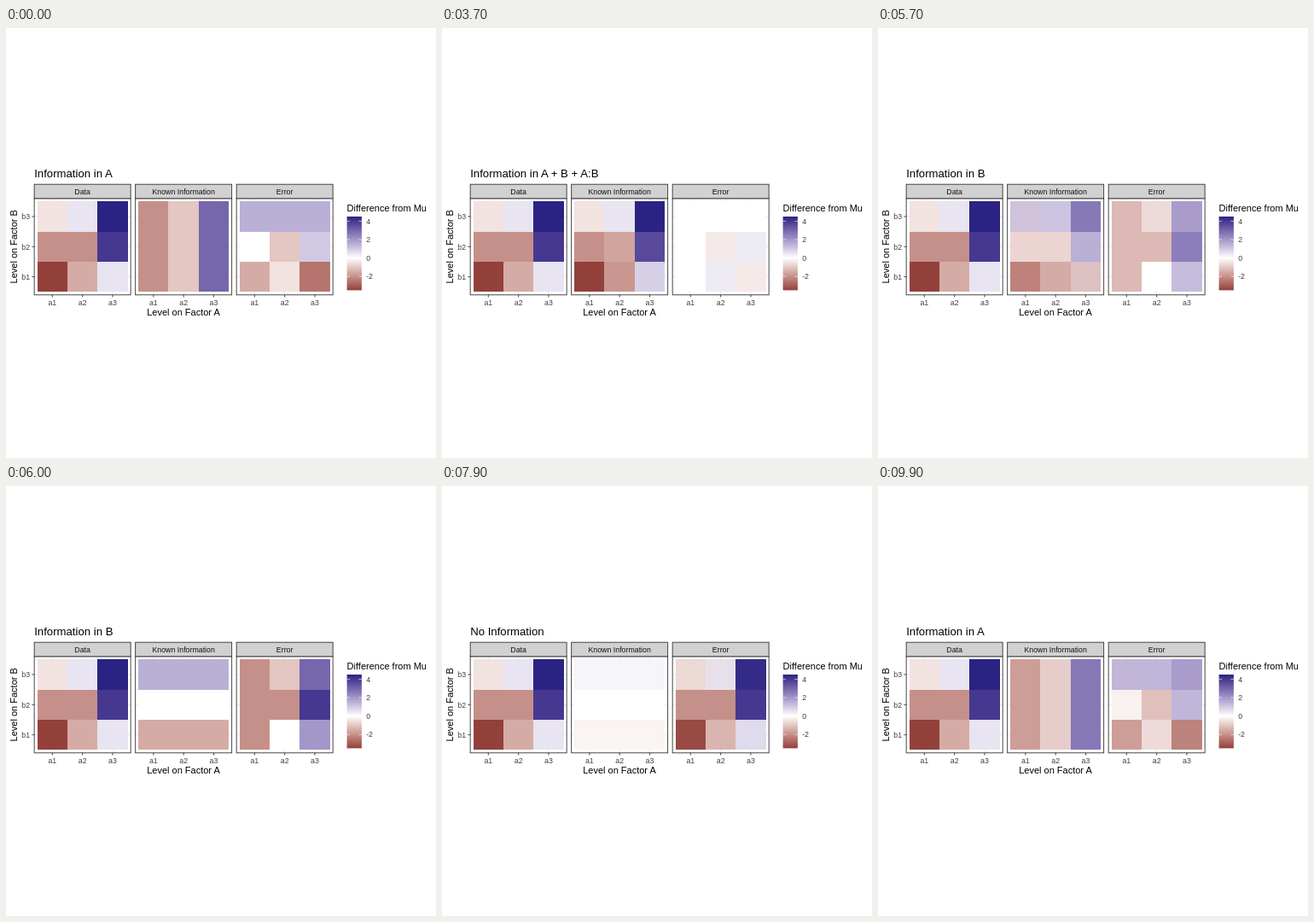
Write an HTML page that moves like this. It is 504x504 px and loops after 10000 ms.

```html
<!DOCTYPE html>
<html lang="en">
<head>
<meta charset="utf-8">
<style>
  html, body { margin: 0; width: 100%; height: 100%; overflow: hidden; background: #fff; }
  svg { display: block; width: 100vw; height: 100vh; font: 11px "Liberation Sans", Arial, sans-serif; }
  .small { font-size: 8.8px; fill: #3f3f3f; }
  .strip { font-size: 8.8px; fill: #111; }
  .mid { text-anchor: middle; }
  .end { text-anchor: end; }
  .grid { stroke: #e8e8e8; }
  .edge { stroke: #333; fill: none; stroke-width: .9; }
  .tile { shape-rendering: crispEdges; }
</style>
</head>
<body>
<svg viewBox="0 0 504 504"></svg>
<script>
const svg = document.querySelector('svg');

function add(tag, attrs, text, parent = svg) {
  const el = document.createElementNS('http://www.w3.org/2000/svg', tag);
  for (const key in attrs) el.setAttribute(key, attrs[key]);
  if (text) el.textContent = text;
  return parent.appendChild(el);
}
const label = (text, x, y, cls = '', more = {}) => add('text', { x, y, class: cls, ...more }, text);
const line = (x1, y1, x2, y2, cls) => add('line', { x1, y1, x2, y2, class: cls });
const mix = (from, to, p) => `color-mix(in lab, ${to} ${p * 100}%, ${from})`;
const colour = v => v < 0 ? mix('#fff', '#93403b', v / -3.5) : mix('#fff', '#2a2383', v / 4.5);

// Rows b1..b3, columns a1..a3, as differences from the mean
const data = [[-3.5, -1.5, .5], [-2, -2, 4], [-.5, .5, 4.5]];
const effectA = [-2, -1, 3];
const effectB = [-1.5, 0, 1.5];

const states = [
  ['Information in A', (i, j) => effectA[j]],
  ['Information in A + B', (i, j) => effectA[j] + effectB[i]],
  ['Information in A + B + A:B', (i, j) => data[i][j]],
  ['Information in B', i => effectB[i]],
  ['No Information', () => 0]
];
const panels = [
  ['Data', (known, i, j) => data[i][j]],
  ['Known Information', (known, i, j) => known(i, j)],
  ['Error', (known, i, j) => data[i][j] - known(i, j)]
];

const size = 113, unit = size / 3.2, left = 33.15, top0 = 199.8, bottom = top0 + size;
const tiles = [];

panels.forEach(([name, value], n) => {
  const x = left + n * 118.5;
  const centre = k => (k + .6) * unit;
  for (let k = 0; k < 3; k++) {
    line(x, top0 + centre(k), x + size, top0 + centre(k), 'grid');
    line(x + centre(k), top0, x + centre(k), bottom, 'grid');
  }
  for (let i = 0; i < 3; i++) for (let j = 0; j < 3; j++) {
    const el = add('rect', {
      x: x + (j + .1) * unit, y: top0 + (2.1 - i) * unit,
      width: unit, height: unit, class: 'tile'
    });
    tiles.push({ el, at: known => colour(value(known, i, j)) });
  }
  add('rect', { x, y: top0, width: size, height: size, class: 'edge' });
  add('rect', { x, y: 183.2, width: size, height: top0 - 183.2, class: 'edge', style: 'fill:#d1d1d1' });
  label(name, x + size / 2, 194.8, 'strip mid');
  for (let k = 0; k < 3; k++) {
    line(x + centre(k), bottom, x + centre(k), bottom + 2.75, 'edge');
    label('a' + (k + 1), x + centre(k), 324.9, 'small mid');
    if (n) continue;
    const y = top0 + centre(2 - k);
    line(x - 2.75, y, x, y, 'edge');
    label('b' + (k + 1), x - 5, y + 3.2, 'small end');
  }
});

const title = label('', left, 175, '', { 'font-size': 13.2 });
label('Level on Factor A', 208, 337, 'mid');
label('Level on Factor B', 0, 0, 'mid', { transform: 'translate(13.4 256.3) rotate(-90)' });

// Colour bar
const barX = 399.6, barW = 17.3, barY = 221, step = 10.8;
const ramp = add('linearGradient', { id: 'ramp', x2: 0, y2: 1 });
for (let v = 4.5; v >= -3.5; v -= .5)
  add('stop', { offset: (4.5 - v) / 8, style: `stop-color:${colour(v)}` }, '', ramp);
add('rect', { x: barX, y: barY, width: barW, height: 8 * step, fill: 'url(#ramp)' });
label('Difference from Mu', barX, 215);
for (const v of [4, 2, 0, -2]) {
  const y = barY + (4.5 - v) * step;
  add('path', {
    d: `M${barX} ${y}h3.5M${barX + barW} ${y}h-3.5`, stroke: '#fff', 'stroke-width': .6
  });
  label(String(v), barX + barW + 5.3, y + 3.2, 'small');
}

let shown = -1;
function draw() {
  const frame = Math.floor(performance.now() / 100) % 100;
  if (frame !== shown) {
    shown = frame;
    // Each state takes 20 frames: a rest of 12, then the change to the next
    const s = Math.floor(frame / 20);
    const p = Math.min(1, Math.max(0, (frame % 20 - 12) / (s ? 8 : 6)));
    const [nameA, from] = states[s], [nameB, to] = states[(s + 1) % 5];
    title.textContent = p > .5 ? nameB : nameA;
    for (const { el, at } of tiles) el.style.fill = mix(at(from), at(to), p);
  }
  requestAnimationFrame(draw);
}
draw();
</script>
</body>
</html>
```
